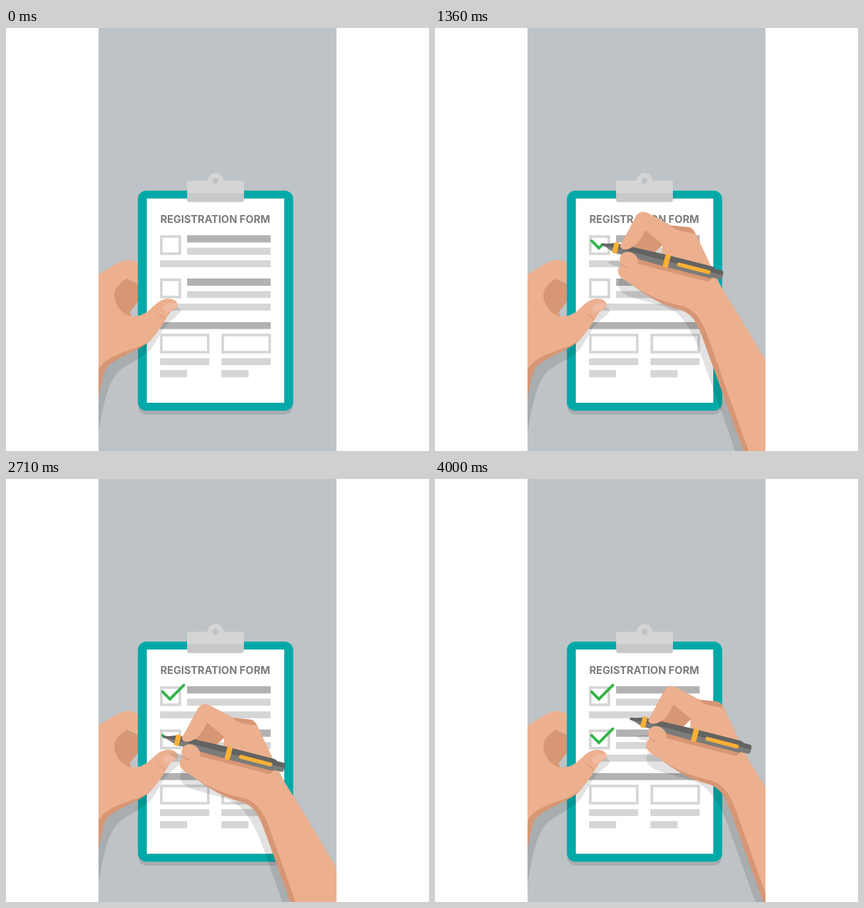
An HTML page with a canvas for the animation above (4.57 s loop, 640 by 640 pixels).

```html
<!DOCTYPE html>
<html lang="en">
<head>
<meta charset="utf-8">
<title>Registration form</title>
<style>
  html, body { margin: 0; width: 100%; height: 100%; overflow: hidden; background: #fff; }
  canvas { display: block; width: 640px; height: 640px; }
</style>
</head>
<body>
<canvas id="stage" width="640" height="640"></canvas>
<script>
const ctx = document.getElementById('stage').getContext('2d');
const LOOP = 4570, FPS = 14;

const color = {
  wall: '#bec3c7', teal: '#00a9a7', dark: '#b2b2b2', light: '#d6d6d6', text: '#7c7c7c',
  skin: '#ecb08f', shade: '#d79674', nail: '#f0bba0', shadow: 'rgba(0,0,0,.115)',
  pen: '#7b7b7a', penDark: '#636362', orange: '#fbb034', green: '#32b44a'
};

// Hand offset at a frame: [frame, x, y, easing into this key]
const linear = u => u;
const sine = u => (1 - Math.cos(Math.PI * u)) / 2;
const settle = u => 1 - Math.pow(1 - u, 1.6);
const keys = [
  [1, 223, 93],
  [12, -55, -23, settle], [17, -44, -12, linear], [25, -23, -33, linear],
  [32.5, -57, 38, sine],
  [36.5, -55, 43, sine], [43.5, -44, 54, linear], [49, -23, 33, linear],
  [56, 4, 18, sine]
];

function handOffset(frame) {
  const next = keys.findIndex(k => k[0] > frame);
  if (next < 0) return keys[keys.length - 1].slice(1, 3);
  const a = keys[next - 1], b = keys[next];
  const u = b[3]((frame - a[0]) / (b[0] - a[0]));
  return [a[1] + (b[1] - a[1]) * u, a[2] + (b[2] - a[2]) * u];
}

function rect(x, y, w, h, fill, r = 0) {
  ctx.fillStyle = fill;
  ctx.beginPath();
  ctx.roundRect(x, y, w, h, r);
  ctx.fill();
}

function box(x, y, w, h) {
  ctx.strokeStyle = color.light;
  ctx.lineWidth = 4;
  ctx.strokeRect(x + 2, y + 2, w - 4, h - 4);
}

function shape(path, fill, rule = 'nonzero') {
  ctx.fillStyle = fill;
  ctx.fill(path, rule);
}

function disc(x, y, r, fill) {
  ctx.fillStyle = fill;
  ctx.beginPath();
  ctx.arc(x, y, r, 0, 7);
  ctx.fill();
}

const left = {
  shadow: new Path2D('M140 612C149 560 155 535 172 518C187 507 207 499 219 486C230 472 235 456 247 445C256 437 264 432 265 427L257 420L140 500Z'),
  fist: new Path2D('M140 373C158 362 170 353 181 351.5C190 350 196 353 201 357L204 388L183 379L176 427L190 437L210 434L210 470L140 515Z'),
  palm: new Path2D('M183 379L203 389V410L187 430L190 437C172 431 163 416 164 402C165 392 174 385 183 379Z'),
  edge: new Path2D('M140 505L205 470L240 443C228 460 222 471 212 478C195 490 165 500 153 513C145 525 143 545 140 562Z'),
  thumb: new Path2D('M140 420L166 415C172 428 180 437 190 437C198 437 207 434 214 429C223 422 230 411 244 409.5C254 409 260 414 259.5 419C259 425 251 427 248 431C240 443 231 460 217 473C204 484 175 489 157 500C148 505 144 511 140 516Z'),
  nail: new Path2D('M237 424C240 418 246 416 253 416Q260 416 258 421C253 427 246 430 241 431Z')
};

// Both skin layers share everything but the inner side of the forearm.
const handOutline = inner => new Path2D(
  'M319 347L342 304C348 294 354 294 362 298L396 316L424 319C431 322 434 330 437 337' +
  'L461 388L475 415L500 455L552 542L720 823' + inner +
  'L333 403C320 396 314 390 316 383L321 376L320 360Z' +
  'M383 346L370 358L382 361Z');

const right = {
  shadow: new Path2D('M300 371Q309 368 318 370L330 385L316 378Q306 377 300 371ZM318 396C312 412 322 420 338 425C365 434 395 436 412 456C422 468 430 484 437 500L487 640L544 823H720L440 400Z'),
  edge: handOutline('L566 823L480 587L445 490C435 462 428 449 408 443C385 438 360 424 333 403'),
  skin: handOutline('L574 823L488 587L453 488C442 456 432 445 414 438C385 432 360 423 333 403'),
  hollow: new Path2D('M357 323L383 345L369 358L335 349C346 346 350 336 357 323Z'),
  wrist: new Path2D('M396 316L424 319Q430 322 432 328C420 326 408 325 400 320Z'),
  index: new Path2D('M321 342C315 350 323 355 333 351C342 347 349 339 352 331L358 322L345 302Z'),
  thumb: new Path2D('M316 383C316 377 322 377 320 373C315 363 322 356 331 356C342 357 349 367 345 376L360 390L350 410L333 403C320 396 314 390 316 383Z'),
  fold: new Path2D('M320 374Q324 379 331 379')
};

function drawBoard() {
  rect(200, 252, 234, 333, color.shadow, 13);
  shape(left.shadow, color.shadow);
  shape(left.fist, color.skin);
  shape(left.palm, color.shade);
  rect(199.5, 246, 235, 333, color.teal, 13);
  rect(213, 258, 208, 309, '#fff');

  rect(274, 231, 86, 32.5, '#c8c8c8', 4);
  rect(274, 231, 86, 19, '#d5d5d5', [4, 4, 0, 0]);
  disc(317, 231.5, 12, '#d5d5d5');
  disc(317, 231, 4.5, color.wall);

  ctx.fillStyle = color.text;
  ctx.font = '700 15.7px Inter, sans-serif';
  ctx.textAlign = 'center';
  ctx.fillText('REGISTRATION FORM', 316.5, 294.8);

  for (const y of [313.5, 379]) {
    box(233, y, 32, 30);
    rect(274, y, 126.5, 11, color.dark);
    rect(274, y + 19, 126.5, 10.5, color.light);
    rect(233, y + 38, 167.5, 10.5, color.light);
  }
  rect(233, 445, 167.5, 10.5, color.dark);
  for (const x of [233, 326]) {
    box(x, 462.5, 75, 30);
    rect(x, 499.5, 74.5, 10.5, color.light);
    rect(x, 517.5, 41, 11, color.light);
  }
}

function drawThumb() {
  ctx.save();
  ctx.beginPath();
  ctx.rect(200, 246, 234, 333);
  ctx.clip();
  shape(left.shadow, color.shadow);
  ctx.restore();
  shape(left.edge, color.shade);
  shape(left.thumb, color.skin);
  shape(left.nail, color.nail);
  ctx.strokeStyle = color.shade;
  ctx.lineWidth = 1.2;
  ctx.beginPath();
  ctx.moveTo(230, 433);
  ctx.quadraticCurveTo(237, 435, 240, 441);
  ctx.stroke();
}

function drawCheck(frame, start, corner, end, dy) {
  if (frame <= start) return;
  const down = Math.min(1, (frame - start) / (corner - start)) * 11;
  const up = Math.max(0, Math.min(1, (frame - corner) / (end - corner))) * 21;
  ctx.strokeStyle = color.green;
  ctx.lineWidth = 4.2;
  ctx.lineCap = 'round';
  ctx.lineJoin = 'miter';
  ctx.beginPath();
  ctx.moveTo(237, 322 + dy);
  ctx.lineTo(237 + down, 322 + down + dy);
  if (up) ctx.lineTo(248 + up, 333 - up + dy);
  ctx.stroke();
  ctx.lineCap = 'butt';
}

function toPenSpace() {
  ctx.translate(291, 344.5);
  ctx.rotate(0.2515);
}

function drawPen() {
  ctx.save();
  toPenSpace();
  rect(172, -7, 17, 14, color.penDark, 4);
  rect(174, 0, 15, 7, color.pen, [0, 0, 4, 0]);
  shape(new Path2D('M0 -1.5L7 -2.5L20 -7L100 -9H170Q178 -9 178 0Q178 9 170 9H100L20 7L7 2.5L0 1.5Z'), color.pen);
  shape(new Path2D('M0 -1.5L7 -2.5L20 -7L100 -9H170Q178 -9 178 0H20L0 1.5Z'), color.penDark);
  rect(18, -8.5, 7.5, 17, color.orange, 2);
  rect(97.5, -10, 8, 20, color.orange, 1.5);
  rect(118, -2.5, 52, 6, color.orange, 3);
  ctx.restore();
}

function drawRightHand(dx, dy) {
  ctx.save();
  ctx.translate(dx, dy);
  shape(right.shadow, color.shadow);
  shape(right.edge, color.shade, 'evenodd');
  shape(right.skin, color.skin, 'evenodd');
  shape(right.hollow, color.shade);
  shape(right.wrist, color.shade);

  ctx.save();
  ctx.clip(right.skin, 'evenodd');
  toPenSpace();
  rect(55, 0, 118, 15, color.shade, 6);
  ctx.restore();

  drawPen();
  shape(right.index, color.skin);
  shape(right.thumb, color.skin);
  ctx.strokeStyle = color.shade;
  ctx.lineWidth = 1.2;
  ctx.stroke(right.fold);
  ctx.restore();
}

function draw(time) {
  const frame = Math.floor((time % LOOP + 4) * FPS / 1000);
  ctx.fillStyle = '#fff';
  ctx.fillRect(0, 0, 640, 640);
  ctx.save();
  ctx.beginPath();
  ctx.rect(140, 0, 360, 640);
  ctx.clip();
  ctx.fillStyle = color.wall;
  ctx.fillRect(140, 0, 360, 640);
  drawBoard();
  drawCheck(frame, 12, 17, 25, 0);
  drawCheck(frame, 36.5, 43.5, 49, 66);
  drawThumb();
  if (frame >= 2) drawRightHand(...handOffset(frame));
  ctx.restore();
}

const began = performance.now();
function tick() {
  draw(performance.now() - began);
  requestAnimationFrame(tick);
}
tick();
</script>
</body>
</html>
```
